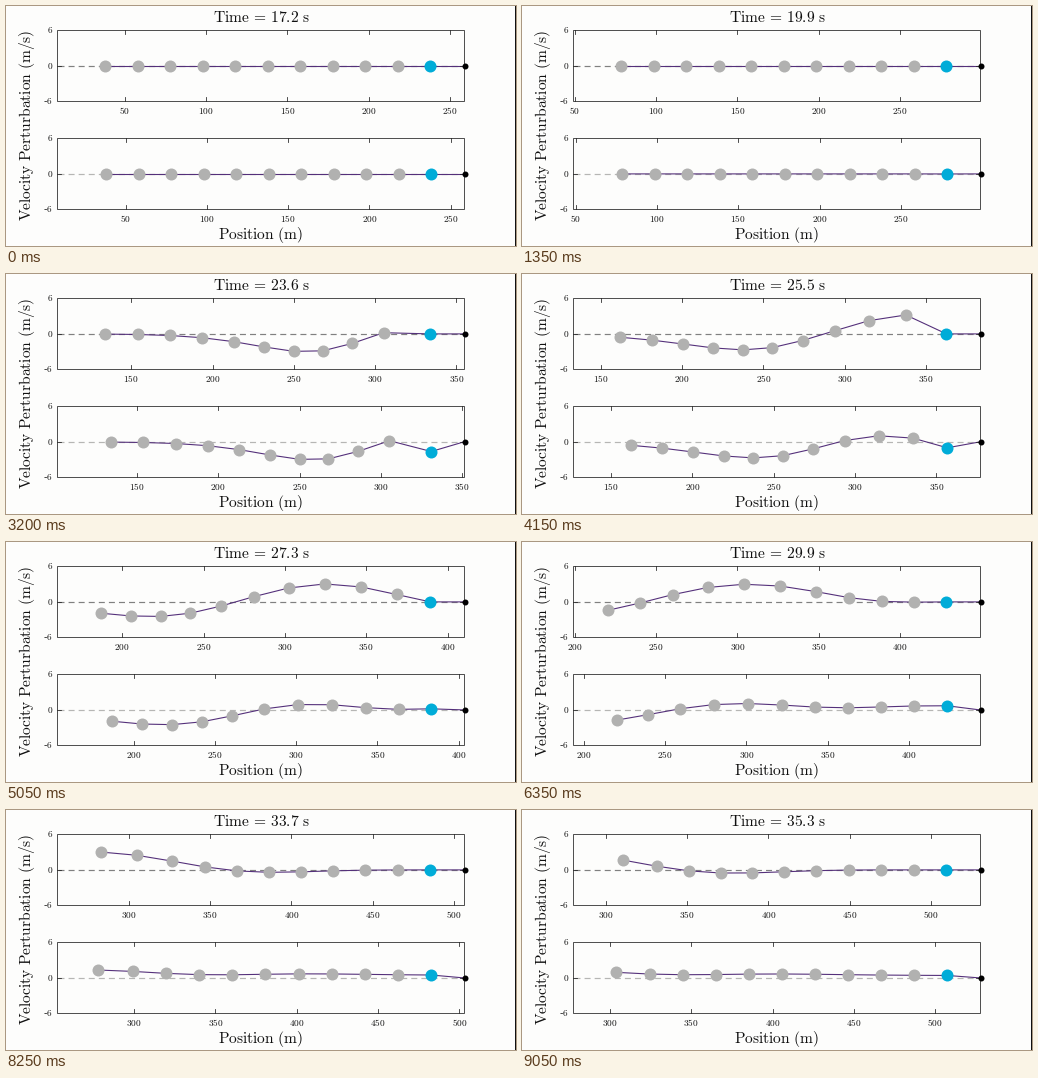
Write a matplotlib script that moves like this. It is 510x240 px and loops after 9.1 s.

```python
import numpy as np
import matplotlib as mpl
import matplotlib.pyplot as plt
from matplotlib.animation import FuncAnimation
from matplotlib.patches import Rectangle

mpl.rcParams["mathtext.fontset"] = "cm"

W, H, DPI = 510, 240, 120
PX = 72 / DPI                       # one pixel in points
FRAMES, INTERVAL = 182, 50
T0, SUB, DT = 17.2, 10, 0.01        # start time, steps per frame, step
SPEED, GAP, CARS, SPAN = 15, 20, 11, 250

LEFT, RIGHT, TALL = 51.2, 457.8, 71
SCALE = (RIGHT - LEFT) / SPAN
PAPER, INK, LINE = "#fdfdfc", "#262626", "#54307a"
GREY, CYAN = "#b1b1b0", "#00acd8"

# speed deviation of the lead car when it reacts to the traffic behind
KNOT_T = [20, 20.5, 21, 22, 23, 23.8, 24.6, 25.5, 26.4, 27.3, 28, 28.8,
          29.9, 32.2, 35.3]
KNOT_V = [0, -.08, -.4, -1.05, -1.45, -1.67, -1.57, -1.0, -.3, .2, .46, .65,
          .7, .56, .4]


def reacting(t):
    return np.mean([np.interp(t + d, KNOT_T, KNOT_V)
                    for d in np.linspace(-.4, .4, 9)])


def steady(t):
    return 0.0


def desired_speed(gap):
    """Optimal velocity as a function of the gap in front."""
    g = np.clip((gap - 5) / 30, 0, 1)
    return SPEED * (1 - np.cos(np.pi * g))


def simulate(lead):
    """Positions and speed deviations of the platoon for every frame."""
    x = SPEED * T0 - GAP * np.arange(1, CARS + 1, dtype=float)
    v = np.zeros(CARS)
    out = []
    for n in range(FRAMES * SUB):
        if n % SUB == 0:
            out.append((x.copy(), v.copy()))
        acc = (.6 * (desired_speed(x[:-1] - x[1:]) - SPEED - v[1:])
               + .9 * (v[:-1] - v[1:]))
        acc = np.clip(acc, -5, 2)
        if 280 <= n < 380:          # the first follower brakes for 1 s
            acc[0] = -5
        old = v.copy()
        v[1:] += acc * DT
        v[0] = lead(T0 + (n + 1) * DT)
        x += (SPEED + (old + v) / 2) * DT
    return out


fig = plt.figure(figsize=(W / DPI, H / DPI), dpi=DPI, facecolor=PAPER)
ax = fig.add_axes([0, 0, 1, 1])
ax.set_xlim(0, W)
ax.set_ylim(H, 0)
ax.axis("off")


def label(x, y, text, size, **kw):
    kw = {"ha": "center", "va": "baseline", **kw}
    return ax.text(x, y, text, fontsize=size * PX, color="#101010", **kw)


def stroke(color, width, **kw):
    return ax.plot([], [], color=color, lw=width * PX, **kw)[0]


def dots(color, size, z):
    return ax.scatter([], [], s=(size * PX) ** 2, color=color, lw=0, zorder=z)


class Panel:
    def __init__(self, top, lead, ahead, zero_color):
        self.top, self.bottom = top, top + TALL
        self.mid = top + TALL / 2 + .2
        self.ahead = ahead
        self.states = simulate(lead)

        ax.add_patch(Rectangle((LEFT, top), RIGHT - LEFT, TALL, fill=False,
                               ec=INK, lw=.8 * PX, zorder=4))
        zero = stroke(zero_color, 1.2, dashes=(5, 3.4), zorder=1)
        zero.set_data([LEFT + 1, RIGHT], [self.mid] * 2)
        for text, y in (("$\\mathrm{6}$", top), ("$\\mathrm{0}$", self.mid),
                        ("-$\\mathrm{6}$", self.bottom)):
            label(47, y + 3.1, text, 9.3, ha="right")
        for a, b in ((LEFT, LEFT + 4), (RIGHT - 4, RIGHT)):
            stroke(INK, .8, zorder=4).set_data([a, b], [self.mid] * 2)

        self.ticks = stroke(INK, .8, zorder=4)
        self.names = [label(0, self.bottom + 13, "", 9.3) for _ in range(6)]
        self.chain = stroke(LINE, 1.1, zorder=2)
        self.cars = dots(GREY, 12, 5)
        self.lead = dots(CYAN, 12, 6)
        self.head = dots("black", 6, 6)

    def draw(self, n):
        x, v = self.states[n]
        end = x[0] + self.ahead
        start = end - SPAN
        px = LEFT + (x - start) * SCALE
        py = self.mid - 6 * v
        self.chain.set_data(np.append(RIGHT, px), np.append(self.mid, py))
        self.cars.set_offsets(np.c_[px[1:], py[1:]])
        self.lead.set_offsets([[px[0], py[0]]])
        self.head.set_offsets([[RIGHT + .7, self.mid]])

        marks = np.arange(np.ceil(start / 50) * 50, end + .01, 50)
        tx, ty = [], []
        for name in self.names:
            name.set_visible(False)
        for name, m in zip(self.names, marks):
            p = LEFT + (m - start) * SCALE
            tx += [p, p, np.nan, p, p, np.nan]
            ty += [self.top, self.top + 4, np.nan,
                   self.bottom - 4, self.bottom, np.nan]
            name.set_x(p)
            name.set_text(rf"$\mathrm{{{m:.0f}}}$")
            name.set_visible(True)
        self.ticks.set_data(tx, ty)


panels = [Panel(24.2, steady, 20.5, "#808080"),
          Panel(132.2, reacting, 20, "#b6b6b4")]
title = label(255, 15.7, "", 15.5)
label(254.5, 233, r"$\mathrm{Position\ (m)}$", 15.5)
label(25.2, 119.5, r"$\mathrm{Velocity\ Perturbation\ (m/s)}$", 15.5,
      rotation=90, rotation_mode="anchor")
ax.add_patch(Rectangle((W - 1, 0), 1, H, color="#101010", lw=0))


def update(n):
    title.set_text(rf"$\mathrm{{Time}}\,=\,\mathrm{{{T0 + n / 10:.1f}\ s}}$")
    for p in panels:
        p.draw(n)
    return []


anim = FuncAnimation(fig, update, frames=FRAMES, interval=INTERVAL,
                     init_func=lambda: update(0), repeat=True, repeat_delay=0)
plt.show()
```
